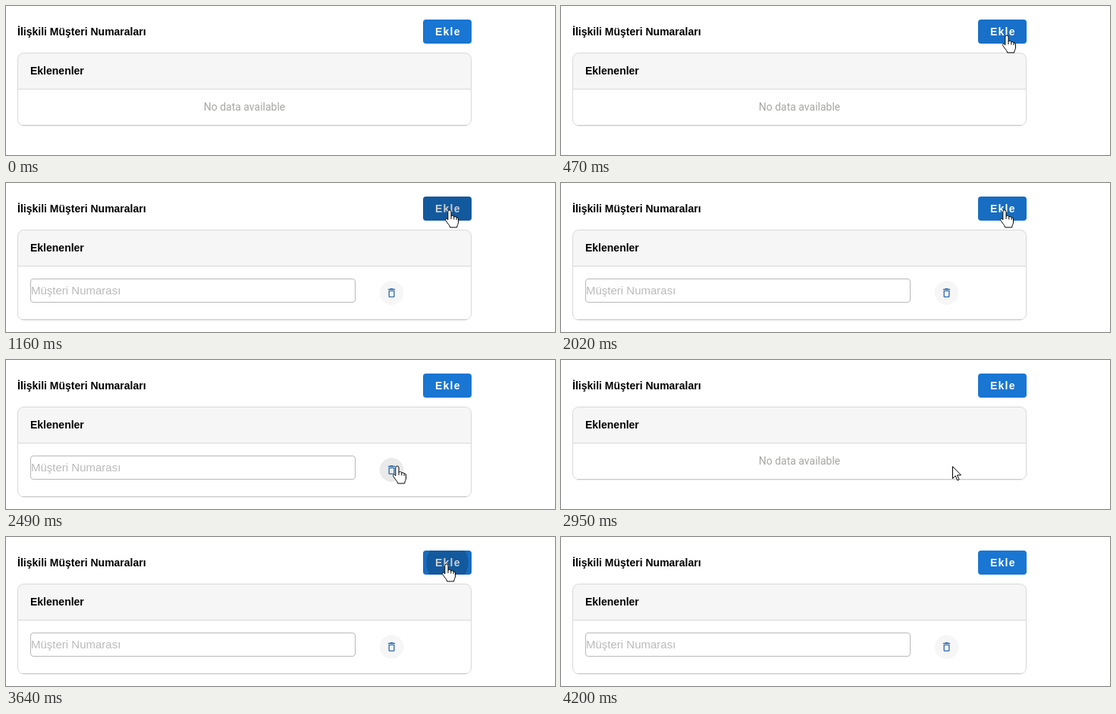
An HTML page for the animation above (4530 ms loop, 724x198 px).

```html
<!DOCTYPE html>
<html lang="tr">
<head>
<meta charset="utf-8">
<style>
  html, body { margin: 0; width: 100%; height: 100%; overflow: hidden; background: #fff; }
  svg { display: block; width: 724px; height: 198px; }
  text { font: bold 14px "Liberation Sans", Arial, sans-serif; }
  .empty { font: 14px Roboto, sans-serif; fill: #a6a6a2; text-anchor: middle; }
  .placeholder { font: 15px "Liberation Sans", Arial, sans-serif; fill: #bababa; }
  .button-label { fill: #fff; letter-spacing: 1.25px; }
  .cursor { fill: #fff; stroke: #000; stroke-linejoin: round; }
</style>
</head>
<body>
<svg viewBox="0 0 724 198">
  <defs>
    <clipPath id="buttonClip"><rect x="550" y="18" width="64" height="32" rx="4"/></clipPath>
    <clipPath id="trashClip"><circle cx="508.5" cy="146" r="16"/></clipPath>
  </defs>

  <text x="15" y="39">İlişkili Müşteri Numaraları</text>

  <g clip-path="url(#buttonClip)">
    <rect x="550" y="18" width="64" height="32" fill="#1976d2"/>
    <rect id="buttonHover" x="550" y="18" width="64" height="32"/>
    <text class="button-label" x="566" y="39">Ekle</text>
    <circle id="buttonRipple" cx="582" cy="34"/>
  </g>

  <path d="M15.5 110V70.500a8 8 0 0 1 8-8H605.500a8 8 0 0 1 8 8V110z" fill="#f6f6f6"/>
  <path d="M16 110.500H613" stroke="#d8d8d8"/>
  <rect id="card" x="15.500" y="62.500" width="598" rx="8" fill="none" stroke="#d8d8d8"/>
  <path id="cardEdge" d="M21 0H608" stroke="#cacaca"/>
  <text x="32" y="91">Eklenenler</text>

  <text id="empty" class="empty" x="314.500" y="139">No data available</text>
  <g id="row">
    <rect x="32.500" y="127.500" width="428" height="31" rx="3.500" fill="#fff" stroke="#b8b8b8"/>
    <text class="placeholder" x="33" y="148">Müşteri Numarası</text>
    <g clip-path="url(#trashClip)">
      <circle cx="508.500" cy="146" r="16" fill="#f6f6f6"/>
      <circle id="trashHover" cx="508.500" cy="146" r="16"/>
      <path transform="translate(500.500 138) scale(.667)" fill="#2f6ca8" fill-rule="evenodd"
        d="M6 19a2 2 0 0 0 2 2h8a2 2 0 0 0 2-2V7H6zM8 9h8v10H8zM15.500 4l-1-1h-5l-1 1H5v2h14V4z"/>
      <circle id="trashRipple" cx="508.500" cy="146"/>
    </g>
  </g>

  <path id="arrow" class="cursor" d="M.5.5V16.500l3.700-3.600 2.600 6 2.300-1-2.600-5.900h5z"/>
  <g id="hand" class="cursor">
    <path d="M-2.200 2a2.100 2.100 0 0 1 4.200 0V8c2-1 3.500-.4 3.800 1 1.600-.8 3-.2 3.300 1 1.400-.4 2.400.3 2.400 2v4c0 3-1.800 4-1.800 7h-9c-.5-3-4-6-6-9.500-1-2 1-3 2.600-1.300l.5.8z"/>
    <path d="M2 8v4M5.800 9v3.500M9.100 10v3" fill="none"/>
  </g>
</svg>

<script>
const LOOP = 4530, STEP = 66.6;
const BURSTS = [0, 70, 800, 2020, 2560, 3150, 3710];

// Pointer tip: [time, x, y]
const PATH = [
  [70, 675, 182], [200, 645, 128], [340, 604, 59], [470, 588, 39], [600, 585, 36],
  [2030, 585, 36], [2150, 574, 58], [2300, 540, 112], [2440, 516, 141],
  [2900, 516, 141], [2960, 523, 122], [3080, 535, 98], [3150, 542, 86],
  [3290, 567, 52], [3420, 581, 36], [3840, 581, 36], [3970, 630, 95], [4110, 695, 171]
];
const GONE = 4170;

const $ = id => document.getElementById(id);
const clamp = v => Math.max(0, Math.min(1, v));
const ramp = (t, from, to) => clamp((t - from) / (to - from));
const show = (el, on) => el.setAttribute("visibility", on ? "inherit" : "hidden");

// The picture advances in short ticks counted from the start of each burst.
function snap(t) {
  const start = BURSTS.findLast(b => b <= t);
  return start + Math.floor((t - start) / STEP) * STEP;
}

function pointerAt(t) {
  const next = PATH.findIndex(p => p[0] > t);
  if (next < 0) return PATH.at(-1).slice(1);
  if (next === 0) return PATH[0].slice(1);
  const [t0, x0, y0] = PATH[next - 1], [t1, x1, y1] = PATH[next];
  const p = ramp(t, t0, t1);
  return [x0 + (x1 - x0) * p, y0 + (y1 - y0) * p];
}

function ripple(el, t, start, fadeStart, maxRadius) {
  const p = ramp(t, start, start + 300);
  el.setAttribute("r", maxRadius * (1 - (1 - p) ** 2));
  el.setAttribute("opacity", 0.19 * (1 - ramp(t, fadeStart, fadeStart + 130)));
}

function draw(t) {
  const hasRow = (t >= 920 && t < 2640) || t >= 3600;
  show($("row"), hasRow);
  show($("empty"), !hasRow);
  const bottom = hasRow ? 182 : 159;
  $("card").setAttribute("height", bottom - 62.5);
  $("cardEdge").setAttribute("transform", `translate(0 ${bottom - 0.5})`);

  const buttonHover = ramp(t, 330, 560) - ramp(t, 2080, 2280) + ramp(t, 3280, 3450) - ramp(t, 3880, 4080);
  $("buttonHover").setAttribute("opacity", 0.08 * buttonHover);
  $("trashHover").setAttribute("opacity", 0.05 * (ramp(t, 2340, 2480) - ramp(t, 2640, 2700)));

  if (t < 2500) ripple($("buttonRipple"), t, 770, 1150, 37);
  else ripple($("buttonRipple"), t, 3466, 3820, 37);
  ripple($("trashRipple"), t, 2500, 2800, 17);

  const [x, y] = pointerAt(t);
  const visible = t >= 70 && t < GONE;
  const overButton = x >= 550 && x <= 614 && y >= 18 && y <= 50;
  const overTrash = hasRow && Math.hypot(x - 508.5, y - 146) < 16;
  const pointing = overButton || overTrash;
  for (const [id, on] of [["hand", pointing], ["arrow", !pointing]]) {
    show($(id), visible && on);
    $(id).setAttribute("transform", `translate(${Math.round(x)} ${Math.round(y)})`);
  }
}

const begin = performance.now();
function frame() {
  draw(snap((performance.now() - begin) % LOOP));
  requestAnimationFrame(frame);
}
frame();
</script>
</body>
</html>
```
